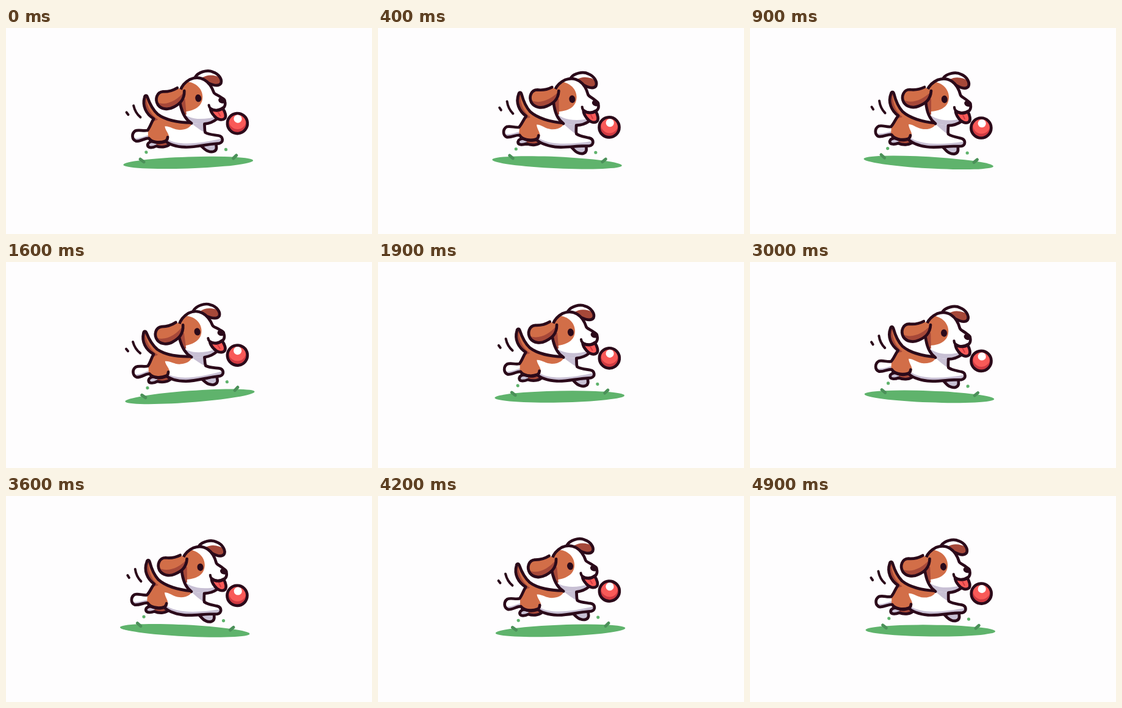
These frames come from a looping animation (600 by 338 pixels, 5000 ms). An HTML page with a canvas:

```html
<!DOCTYPE html>
<html lang="en">
<head>
<meta charset="utf-8">
<title>Running puppy</title>
<style>
html, body { margin: 0; width: 100%; height: 100%; overflow: hidden; background: #fefdfe; }
canvas { display: block; width: 600px; height: 338px; }
</style>
</head>
<body>
<canvas id="stage" width="600" height="338"></canvas>
<script>
const ctx = document.getElementById('stage').getContext('2d');

const LOOP = 5000, STEP = 100;
const PIVOT = { x: 297, y: 155 };
const REST = 3.3; // tilt at which the artwork is drawn

const INK = '#2b0a1a', BROWN = '#d26e48', DARK = '#a64839', WHITE = '#ffffff',
  SHADE = '#c8c0d4', RED = '#f95a58', DEEP = '#d03a42', GRASS = '#5fb36c', TUFT = '#4b9159';

// [seconds, degrees]
const TILT = [[0, -1.9], [.3, 4.1], [.6, -2], [.8, 4.1], [.9, 3.3], [1.2, 1.5], [1.6, -4.3],
  [1.8, -1.5], [2.3, 3.3], [2.7, -.5], [3, 2.2], [3.3, 3.2], [3.6, 2.9], [4.2, -2.2],
  [4.5, 2.3], [4.8, .6], [5, .6]];

const path = d => new Path2D(d);

const body = path('M304 156 C284 154 262 148 250 137 C241 127 238 116 236 108 C235 104 232 104 231 108 ' +
  'C226 121 231 135 243 144 C238 150 236 157 231 162 C224 163 217 159 211 161 C204 165 204 175 211 178 ' +
  'C219 179 226 174 232 175 C236 182 248 185 259 182 C263 187 274 193 290 195 C305 197 322 194 334 194 ' +
  'L346 194 C354 193 354 183 346 181 C338 179 330 178 325 174 C324 170 325 166 325 160');
const saddle = path('M222 100 L238 100 L250 134 C264 147 284 152 305 153 C306 160 298 167 284 166 ' +
  'C274 165 268 158 260 158 C260 166 268 172 264 180 C258 190 240 188 232 184 C229 176 233 168 231 160 L222 135 Z');
const tailShade = path('M224 104 L234 108 C233 124 240 138 250 146 L240 149 L222 130 Z');
const pawShade = path('M202 170 C212 177 223 171 234 169 L234 184 L202 184 Z');
const bellyShade = path('M260 178 C280 194 318 191 354 186 L354 200 L260 200 Z');
const neckShade = path('M296 150 L330 152 L330 178 C318 171 310 163 296 150 Z');
const thighLine = path('M234 179 C246 186 262 186 263 176');
const farFront = path('M316 195 C320 199 322 203 327 205 C333 208 340 207 341 201 L341 192 Z');
const farHind = path('M246 181 C238 180 230 180 229 186 C229 192 238 191 243 189 C252 193 262 192 268 186 L262 178 Z');
const farPaw = path('M224 176 L243 178 L244 196 L224 196 Z');

const head = path('M304 157 C296 151 291 141 289 128 C286 112 288 94 308 85 C326 79 340 90 345 110 ' +
  'C346 113 352 115 356 119 C364 124 363 133 358 137 L347 153 C340 158 333 160 325 160');
const eyePatch = path('M280 88 L300 88 C318 90 327 103 326 115 C325 130 312 138 288 137 Z');
const patchShade = path('M284 120 L297 116 L297 142 L284 142 Z');
const chinShade = path('M286 132 C296 150 320 155 348 149 L346 164 L290 164 Z');
const tongue = path('M337 136 C344 141 352 141 357 137 C361 144 362 151 359 154 C354 158 346 154 342 148 C339 144 337 141 337 136 Z');
const tongueLine = path('M349 143 L352 149');
const smile = path('M335 130 C335 137 346 143 358 136');

const nearEar = path('M286 97 C278 101 270 102 262 101 C252 101 247 112 252 122 C257 130 268 132 277 128 ' +
  'C287 124 296 118 297 103');
const earShade = path('M246 114 C260 127 282 120 298 103 L300 135 L248 135 Z');
const farEar = path('M317 82 C322 75 337 71 346 76 C356 80 361 90 358 96 C354 101 345 98 338 94');
const farEarTan = path('M327 85 C338 78 350 82 361 88 L360 104 L336 102 Z');

function fill(p, color) {
  ctx.fillStyle = color;
  ctx.fill(p);
}

function stroke(p, color = INK, width = 4.7) {
  ctx.strokeStyle = color;
  ctx.lineWidth = width;
  ctx.stroke(p);
}

// Filled shape with clipped colour areas and an outline on top
function part(shape, base, areas = []) {
  fill(shape, base);
  ctx.save();
  ctx.clip(shape);
  for (const [p, color] of areas) fill(p, color);
  ctx.restore();
  stroke(shape);
}

function oval(x, y, rx, ry = rx, turn = 0) {
  const p = new Path2D();
  p.ellipse(x, y, rx, ry, turn, 0, Math.PI * 2);
  return p;
}

function drawGround() {
  fill(oval(292.7, 220.8, 106.4, 9.5, REST * Math.PI / 180), GRASS);
  stroke(path('M215 208 L220.5 213 M372.5 216 L367 220.5'), TUFT, 5);
  fill(oval(225.7, 197.6, 2.6), GRASS);
  fill(oval(356.2, 205, 2.6), GRASS);
}

function drawBody() {
  stroke(path('M199.5 129.5 L202 133.5 M212 119.5 C213 127 216 134 221.5 139.5'), INK, 4);
  part(farFront, SHADE);
  part(farHind, DARK, [[farPaw, SHADE]]);
  part(body, WHITE, [[pawShade, SHADE], [bellyShade, SHADE], [neckShade, SHADE],
    [saddle, BROWN], [tailShade, DARK]]);
  stroke(thighLine);
}

function drawHead() {
  part(farEar, WHITE, [[farEarTan, DARK]]);
  part(head, WHITE, [[chinShade, SHADE], [eyePatch, BROWN], [patchShade, DARK]]);
  part(tongue, RED);
  stroke(tongueLine, DEEP, 2);
  stroke(smile, INK, 4.2);
  fill(oval(357.5, 124, 6.4, 5, .3), INK);
  part(nearEar, BROWN, [[earShade, DARK]]);
  fill(oval(318.8, 117, 5, 6.2, -.1), INK);
}

function drawBall() {
  part(oval(378.9, 164, 16.5), DEEP, [[oval(379.5, 159.5, 14), RED]]);
  fill(oval(380.2, 156.6, 6.6), WHITE);
}

function tiltAt(t) {
  const i = TILT.findIndex(k => k[0] > t);
  const [t0, a] = TILT[i - 1], [t1, b] = TILT[i];
  const u = (t - t0) / (t1 - t0);
  return a + (b - a) * (1 - Math.cos(Math.PI * u)) / 2;
}

function draw(ms) {
  const t = Math.floor(ms % LOOP / STEP) * STEP / 1000;
  ctx.fillStyle = '#fefdfe';
  ctx.fillRect(0, 0, 600, 338);
  ctx.save();
  ctx.translate(PIVOT.x, PIVOT.y);
  ctx.rotate((tiltAt(t) - REST) * Math.PI / 180);
  ctx.translate(-PIVOT.x, -PIVOT.y);
  ctx.lineCap = ctx.lineJoin = 'round';
  drawGround();
  drawBody();
  drawHead();
  drawBall();
  ctx.restore();
}

const start = performance.now();
function tick() {
  draw(performance.now() - start);
  requestAnimationFrame(tick);
}
tick();
</script>
</body>
</html>
```
